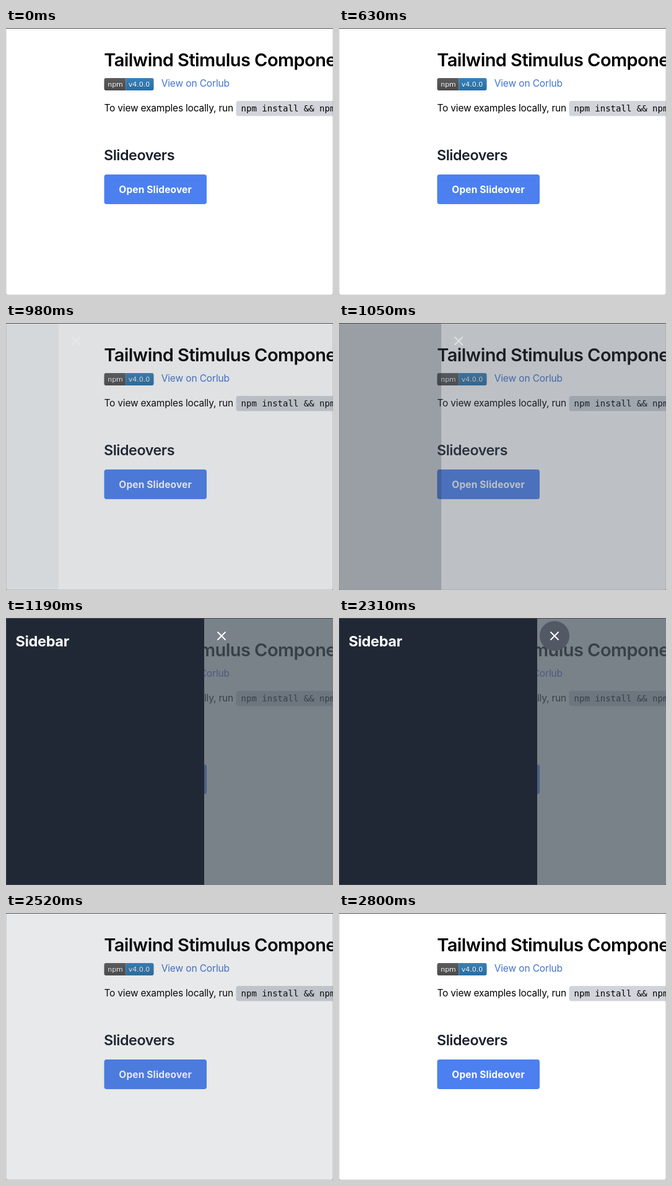
These frames come from a looping animation (528x432 px, 2870 ms). An HTML page:

```html
<!DOCTYPE html>
<html lang="en">
<head>
<meta charset="utf-8">
<title>Slideover</title>
<style>
  html, body { margin: 0; width: 100%; height: 100%; overflow: hidden; background: #fff; }
  svg { display: block; width: 528px; height: 432px; }
  text { font-family: Inter, "Liberation Sans", sans-serif; font-size: 15.5px; white-space: pre; }
  .title { font-size: 29px; font-weight: 600; letter-spacing: -.57px; }
  .badge text { font: 11px "DejaVu Sans", sans-serif; fill: #fff; text-anchor: middle; }
  .badge .shade { fill: #010101; fill-opacity: .3; }
  .link { fill: #4272d0; letter-spacing: -.14px; }
  .intro { letter-spacing: -.2px; }
  .code { font: 14px "DejaVu Sans Mono", monospace; }
  .section { font-size: 23.3px; font-weight: 600; letter-spacing: -.45px; fill: #1a202c; }
  .label { font-weight: 700; letter-spacing: .14px; fill: #fff; }
  .heading { font-size: 23.5px; font-weight: 700; letter-spacing: -.35px; fill: #fff; }
</style>
</head>
<body>
<svg viewBox="0 0 528 432">
  <defs>
    <linearGradient id="gloss" x2="0" y2="1">
      <stop offset="0" stop-color="#bbb" stop-opacity=".1"/>
      <stop offset="1" stop-opacity=".1"/>
    </linearGradient>
    <clipPath id="pill"><rect x="158.5" y="81" width="80" height="20" rx="3"/></clipPath>
  </defs>

  <rect width="528" height="432" fill="#fff"/>
  <text class="title" x="158.3" y="62">Tailwind Stimulus Components</text>

  <g class="badge">
    <g clip-path="url(#pill)">
      <rect x="158" y="81" width="35.5" height="20" fill="#525252"/>
      <rect x="193.5" y="81" width="46" height="20" fill="#2a7ab8"/>
      <rect x="158" y="81" width="81" height="20" fill="url(#gloss)"/>
    </g>
    <text class="shade" x="176.5" y="96">npm</text>
    <text x="176.5" y="95">npm</text>
    <text class="shade" x="215" y="96">v4.0.0</text>
    <text x="215" y="95">v4.0.0</text>
  </g>
  <text class="link" x="250.7" y="95">View on Corlub</text>

  <text class="intro" x="158.5" y="135">To view examples locally, run</text>
  <rect x="371.5" y="118" width="170" height="24.5" rx="4" fill="#d1d4da"/>
  <text class="code" x="379.6" y="135">npm install &amp;&amp; npm</text>

  <text class="section" x="158" y="214">Slideovers</text>
  <rect x="158.5" y="237" width="165.5" height="48" rx="4" fill="#4c80f0"/>
  <text class="label" x="182.3" y="267">Open Slideover</text>

  <rect id="backdrop" width="528" height="432" fill="#4b5561" fill-opacity=".74"/>
  <g id="drawer">
    <g id="panel">
      <rect width="320" height="432" fill="#212835"/>
      <text class="heading" x="15.5" y="46">Sidebar</text>
      <circle id="focus" cx="348" cy="29" r="24" fill="#525864"/>
    </g>
    <path id="close" d="M342 23l12 12m0-12l-12 12" fill="none" stroke="#fff" stroke-width="2" stroke-linecap="round"/>
  </g>

  <rect x=".5" y=".5" width="527" height="431" rx="2" fill="none" stroke="#808488" stroke-opacity=".25"/>
  <path d="M0 .5H528" stroke="#4c4c4e"/>
  <path d="M0 430q0 2 2 2h-2zM528 430q0 2-2 2h2z" fill="#4c4c4e"/>
</svg>
<script>
  const LOOP = 2870, STEP = 70;
  const OPEN = { at: 838, length: 315 };
  const FADE = { at: 2314, length: 250 };
  const SLIDE = { at: 2314, length: 208 };
  const FOCUS_AT = 2310;

  const el = id => document.getElementById(id);
  const [backdrop, drawer, panel, focusRing, close] =
    ['backdrop', 'drawer', 'panel', 'focus', 'close'].map(el);

  const progress = (t, { at, length }) => Math.min(1, Math.max(0, (t - at) / length));
  const easeInOut = u => u * u * (3 - 2 * u);

  function draw(now) {
    // The picture advances in whole steps, like a screen recording.
    const t = Math.floor((now % LOOP) / STEP) * STEP;
    const opened = progress(t, OPEN);
    const alpha = opened ** 1.8 * (1 - progress(t, FADE));
    const shown = opened ** 1.67 * (1 - easeInOut(progress(t, SLIDE)));

    backdrop.setAttribute('opacity', alpha);
    panel.setAttribute('opacity', alpha ** 2.1);
    close.setAttribute('opacity', shown);
    focusRing.setAttribute('opacity', t >= FOCUS_AT ? shown : 0);
    drawer.setAttribute('transform', `translate(${320 * (shown - 1)} 0)`);
  }

  const start = performance.now();
  function tick() {
    draw(performance.now() - start);
    requestAnimationFrame(tick);
  }
  tick();
</script>
</body>
</html>
```
